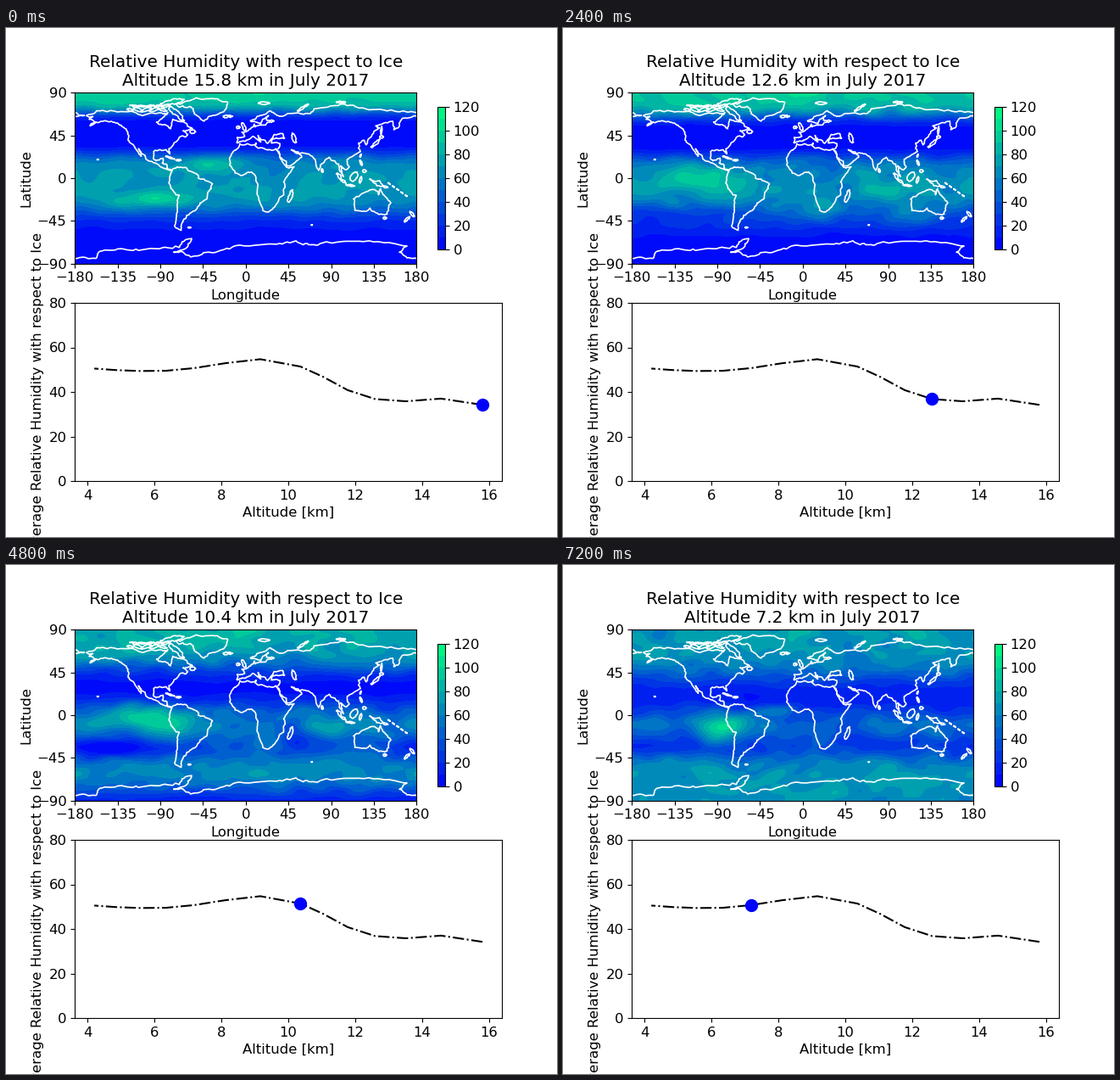
Write a matplotlib script that moves like this. It is 650 px wide and 600 px high and loops after 8000 ms.

```python
import numpy as np
import matplotlib.pyplot as plt
from matplotlib.animation import FuncAnimation

plt.rcParams.update({"font.size": 11.85, "axes.titlesize": 14.4, "font.family": "DejaVu Sans"})
rng = np.random.default_rng(7)

# Pressure levels (hPa) and their height in the standard atmosphere (km)
pressure = np.r_[100:250:25, 250:601:50]
altitude = 44.33 * (1 - (pressure / 1013.25) ** 0.1903)
average = [34.2, 37.0, 35.8, 36.8, 40.8, 46.8, 51.4, 54.7, 52.9, 50.7, 49.5, 49.4, 49.8, 50.5]
FRAMES = 10

lon = np.linspace(-180, 180, 181)
lat = np.linspace(-90, 90, 121)
LON, LAT = np.meshgrid(lon, lat)

# Moist and dry regions: lon, lat, width, height, gain, altitude of the peak, depth
REGIONS = [
    (-35, 16, 30, 8, 30, 15.8, 1.2),
    (-95, -22, 42, 8, 30, 15.8, 1.6),
    (-115, -1, 32, 11, 42, 11, 3),
    (-80, -10, 27, 14, 42, 8, 5),
    (-92, -25, 16, 14, 30, 7, 2),
    (-30, 5, 22, 6, 32, 7, 3),
    (85, -12, 27, 9, 24, 11, 4),
    (-160, -9, 24, 7, 26, 9, 4),
    (15, -38, 28, 10, 34, 11.8, 1.2),
    (120, -40, 30, 11, 28, 11.8, 1.5),
    (-140, -34, 40, 11, -46, 10, 2.5),
    (55, -25, 13, 13, -22, 10.5, 2),
    (165, -30, 22, 10, -18, 9, 2.5),
    (100, 22, 50, 8, 15, 14.5, 1.8),
    (35, -62, 27, 7, 24, 10.8, 0.7),
]


def sigmoid(x):
    return 1 / (1 + np.exp(-x))


def zonal(alt):
    """Two moist polar caps and a tropical belt that change with altitude."""
    t = np.clip((alt - 8) / 6, 0, 1)
    high = t * t * (3 - 2 * t)
    north = (72 + 24 * high) * sigmoid((LAT - 40 - 30 * high) / (9 - 5 * high))
    cut = 40 + 60 * np.clip((13 - alt) / 4, 0, 1.2)
    south = 70 * sigmoid((-42 - LAT) / 6) * sigmoid((LAT + cut) / 8)
    offset = np.abs(LAT + 12 - 7 * high) / (22 + 10 * high)
    belt = (44 + 24 * high) * np.exp(-offset ** (2 + 2.5 * high))
    return north + south + belt


def region(alt, x, y, width, height, gain, peak, depth):
    dx = (LON - x + 180) % 360 - 180
    return gain * np.exp(-(dx / width) ** 2 - ((LAT - y) / height) ** 2
                         - ((alt - peak) / depth) ** 2)


MODES = [(kx, ky, rng.uniform(0, 6.28), rng.normal(0, 0.25))
         for kx, ky in zip(rng.integers(1, 12, 60), rng.integers(-22, 23, 60))]


def texture(alt):
    waves = sum(np.cos(np.radians(kx * LON + ky * LAT) + phase + drift * alt)
                / (3 + np.hypot(kx, ky / 2)) for kx, ky, phase, drift in MODES)
    return waves / waves.std()


def humidity(alt):
    field = zonal(alt) + sum(region(alt, *r) for r in REGIONS)
    rough = np.interp(alt, [12, 15.8], [5, 3])
    field += rough * texture(alt) * np.clip(field / 40, 0, 1)
    return np.clip(field, 0, 119)


fig, (world, chart) = plt.subplots(2, 1, figsize=(6.5, 6), dpi=100)
layers = [world.contourf(lon, lat, humidity(alt), levels=np.arange(0, 121, 10), cmap="winter")
          for alt in altitude[:FRAMES]]


def coast(*coords):
    """Draw a shoreline through lon, lat pairs, roughened between them."""
    pts = np.array(coords, float).reshape(-1, 2)
    for _ in range(3):
        step = np.diff(pts, axis=0)
        size = np.minimum(np.hypot(*step.T), 9)
        mid = pts[:-1] + step / 2 + rng.normal(0, 0.1, step.shape) * size[:, None]
        out = np.empty((len(pts) * 2 - 1, 2))
        out[::2], out[1::2] = pts, mid
        pts = out
    world.plot(*pts.T, color="white", lw=1.2)


def loop(*coords):
    coast(*coords, *coords[:2])


def island(x, y, length, width, tilt=0):
    """Draw a rough ellipse from its half axes and tilt in degrees."""
    turn = np.linspace(0, 2 * np.pi, 8)
    shape = length * np.cos(turn) + 1j * width * np.sin(turn)
    shape = x + 1j * y + shape * np.exp(1j * np.radians(tilt))
    coast(*np.c_[shape.real, shape.imag].ravel())


# North America
coast(-78, 7.5, -85, 10, -95, 16, -105, 20, -113, 31, -110, 23, -117, 33, -124, 40, -124, 48,
      -135, 58, -150, 60, -164, 55, -158, 59, -165, 62, -161, 65, -168, 66, -157, 71, -128, 70,
      -95, 68, -82, 69, -87, 64, -94, 59, -82, 55, -79, 52, -77, 62, -65, 59, -56, 52, -66, 50,
      -61, 46, -70, 43, -76, 36, -81, 31, -80, 25.5, -84, 30, -97, 28, -97, 20, -91, 19,
      -87, 21, -88, 16, -84, 15, -83, 10, -78, 8.5)
# South America
coast(-78, 8.5, -72, 12, -62, 10.5, -51, 4, -50, 0, -35, -6, -39, -14, -41, -22, -48, -26,
      -57, -36, -62, -39, -65, -43, -68, -50, -68, -55, -75, -50, -73, -38, -70, -18,
      -76, -14, -81, -5, -78, 7.5)
# Africa
loop(-6, 36, 11, 37, 10, 34, 20, 31, 32, 31, 37, 20, 43, 11.5, 51, 12, 40, -4, 40, -15,
     35, -22, 32, -28, 26, -34, 18, -34, 12, -17, 13, -7, 9, 4, 4, 6, -8, 4.5, -17, 14,
     -17, 21, -10, 30)
# Asia, from the Red Sea around to the Arctic
coast(32, 30, 35, 28, 43, 13, 59, 22, 56, 26, 48, 30, 57, 26, 67, 25, 73, 20, 77, 8, 80, 15,
      88, 22, 94, 18, 98, 15, 99, 8, 103, 1.5, 100, 13, 105, 9, 109, 12, 107, 20, 121, 28,
      119, 37, 125, 40, 127, 35, 129, 41, 141, 53, 137, 55, 155, 60, 156, 51, 163, 60, 180, 65)
coast(-180, 69, -170, 66, -180, 65)
# Europe, from the Arctic around to the Levant
coast(180, 69, 160, 70, 130, 72, 104, 78, 72, 73, 68, 68, 44, 68, 33, 66, 26, 71, 12, 65,
      5, 60, 11, 59, 16, 57, 18, 62, 24, 66, 22, 61, 30, 60, 21, 56, 10, 54, 9, 57, 8, 54,
      -4, 48.5, -1, 44, -9, 43, -9, 37, 0, 39, 8, 44, 16, 38, 13, 45, 23, 36.5, 27, 41,
      30, 46, 39, 47, 41, 42, 28, 41, 27, 37, 36, 36.5, 34, 31)
# Greenland, Australia, New Guinea, Antarctica
loop(-73, 78, -59, 75.5, -53, 67, -44, 60, -39, 65, -23, 70, -19, 80, -32, 83.5, -58, 82)
loop(114, -22, 115, -34, 131, -31.5, 140, -38, 149, -38, 153, -26, 146, -18, 142, -11,
     140, -17.5, 136, -12, 130, -13)
loop(131, -1, 135, -3, 141, -2.5, 150, -10, 138, -8, 134, -4)
coast(-180, -84.5, -158, -84.5, -155, -78, -135, -74.5, -100, -74, -70, -73, -67, -67,
      -57, -63.5, -62, -73, -76, -78, -58, -83, -35, -78.5, -10, -71, 30, -69.5, 53, -66,
      72, -70, 85, -67, 130, -66, 170, -71.5, 162, -78, 170, -84, 180, -84.5)

for x, y in zip(np.linspace(-122, -84, 10), np.tile([72, 76], 5)):
    island(x, y, rng.uniform(3, 6), rng.uniform(0.7, 1.7), rng.uniform(-20, 20))
island(-73, 68, 11, 3, -42)      # Baffin
island(-78, 80, 13, 2.5, 12)     # Ellesmere
island(-19, 65, 5, 1.4)          # Iceland
island(-56, 49, 3, 2)            # Newfoundland
island(-80, 21.7, 5, 0.6, -18)   # Cuba
island(-71, 19, 2.6, 0.8)        # Hispaniola
island(-2, 54, 4.5, 1.8, 115)    # Great Britain
island(-8, 53.5, 1.8, 1.5)       # Ireland
island(51, 42, 5.5, 2, 110)      # Caspian Sea
island(60, 74, 7, 1.2, 33)       # Novaya Zemlya
island(19, 79, 6, 1.2)           # Svalbard
island(100, 80, 5, 1)            # Severnaya Zemlya
island(47, -19, 7, 2, 72)        # Madagascar
island(80.8, 7.8, 1.8, 1, 100)   # Sri Lanka
island(100.5, 0, 7.5, 1.6, -48)  # Sumatra
island(110, -7.5, 4.8, 0.7, -8)  # Java
island(114, 1.5, 5.5, 3.3, 55)   # Borneo
island(121, -2, 3.5, 1.2, 75)    # Sulawesi
island(121.5, 16, 3, 1, 110)     # Luzon
island(125, 7.5, 1.8, 1.5)       # Mindanao
island(121, 23.6, 1.6, 0.6, 70)  # Taiwan
island(136.5, 36.5, 6.5, 1.3, 42)
island(143, 43.5, 2, 1.4)        # Hokkaido
island(143, 50, 4.2, 0.7, 85)    # Sakhalin
island(146.5, -42, 1.7, 1.4)     # Tasmania
island(175.5, -38, 3.5, 1.3, 130)
island(170, -43.5, 4, 1.2, 45)   # New Zealand, south
island(-156, 19.6, 0.5, 0.4)     # Hawaii
island(-59.5, -52, 1.4, 0.5)     # Falklands
island(69.5, -49.3, 0.6, 0.3)    # Kerguelen
for k in range(5):               # Melanesian arc
    island(151 + 4.5 * k, -5.5 - 3.2 * k, 1.3, 0.3, -35)

world.set(xlim=(-180, 180), ylim=(-90, 90), aspect="equal", xlabel="Longitude",
          ylabel="Latitude", xticks=range(-180, 181, 45), yticks=range(-90, 91, 45))
fig.colorbar(layers[0], ax=world, shrink=0.8)

chart.plot(altitude, average, "k-.")
dot, = chart.plot([], [], "o", color="blue", markersize=10)
chart.set(ylim=(0, 80), xticks=range(4, 17, 2), yticks=range(0, 81, 20),
          xlabel="Altitude [km]", ylabel="Average Relative Humidity with respect to Ice")


def update(i):
    for j, layer in enumerate(layers):
        layer.set_visible(i == j)
    dot.set_data([altitude[i]], [average[i]])
    world.set_title("Relative Humidity with respect to Ice\n"
                    f"Altitude {altitude[i]:.1f} km in July 2017")


anim = FuncAnimation(fig, update, frames=FRAMES, interval=800, repeat=True)
plt.show()
```
